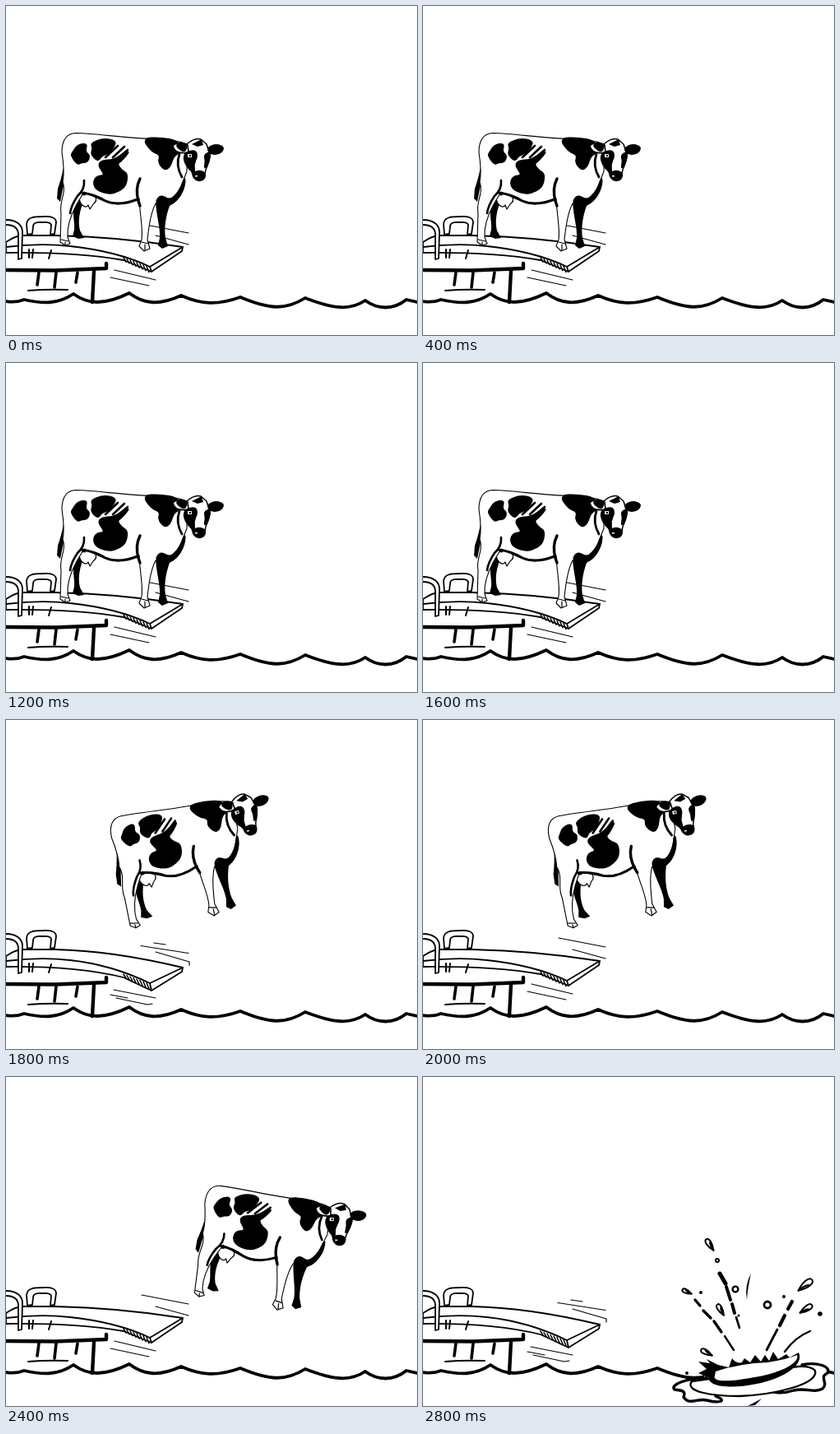
Write an HTML page with a canvas that moves like this. It is 500 by 400 pixels and loops after 3.8 s.

```html
<!DOCTYPE html>
<html lang="en">
<head>
<meta charset="utf-8">
<title>Diving cow</title>
<style>
html, body { margin: 0; width: 100%; height: 100%; overflow: hidden; background: #fff; }
canvas { display: block; }
</style>
</head>
<body>
<canvas id="stage" width="500" height="400"></canvas>
<script>
const ctx = document.getElementById('stage').getContext('2d');
const LOOP = 3800, STEP = 200, LAST = 14;
ctx.lineCap = ctx.lineJoin = 'round';

function line(d, width = 1.8) {
  ctx.lineWidth = width;
  ctx.strokeStyle = '#000';
  ctx.stroke(new Path2D(d));
}
function fill(d, color = '#000') {
  ctx.fillStyle = color;
  ctx.fill(new Path2D(d));
}
function shape(d, width = 1.8) {
  fill(d, '#fff');
  line(d, width);
}
function dot(x, y, r, ring = 0) {
  ctx.beginPath();
  ctx.arc(x, y, r, 0, Math.PI * 2);
  ctx.fillStyle = ring ? '#fff' : '#000';
  ctx.fill();
  if (ring) { ctx.lineWidth = ring; ctx.stroke(); }
}
// Black patch with rounded corners near the given points
function patch(points) {
  const p = points.split(' ').map(s => s.split(',').map(Number));
  const mid = (a, b) => `${(a[0] + b[0]) / 2} ${(a[1] + b[1]) / 2}`;
  let d = 'M' + mid(p[p.length - 1], p[0]);
  p.forEach((q, i) => { d += `Q${q[0]} ${q[1]} ${mid(q, p[(i + 1) % p.length])}`; });
  fill(d);
  line(d, 1.8);
}

// Alternating crests and troughs of the water line
const WAVES = [[22, 357], [56, 362], [82, 350], [112, 363], [150, 349], [180, 363],
  [213, 352], [250, 363], [285, 354], [333, 369], [364, 355], [412, 369],
  [437, 358], [464, 369], [487, 357], [500, 361]];

function water(splashing) {
  ctx.save();
  if (splashing) {
    ctx.beginPath();
    ctx.rect(0, 330, 342, 60);
    ctx.rect(493, 330, 7, 60);
    ctx.clip();
  }
  let d = 'M0 359Q12 361 22 357';
  for (let i = 1; i < WAVES.length - 1; i += 2) {
    const [tx, ty] = WAVES[i], [cx, cy] = WAVES[i + 1];
    d += `C${tx - 12} ${ty} ${tx + 7} ${ty + 1} ${cx} ${cy}`;
  }
  line(d + 'L500 360', 3.8);
  ctx.restore();
}

function dock() {
  line('M0 321L60 321.5L122 319V313', 4.4);
  line('M107 322L105 360', 4.4);
  line('M40 324L38 339M61 324L59 342M87 324L85 336', 3.6);
  line('M27 346Q50 344 75 345', 2);
}

function board(low) {
  const k = low ? 1 : 0, tip = 293 + 8 * k, front = 317 + 3 * k;
  const bottom = 323 + 6 * k;
  shape(`M0 287Q12 279 20 279H60C110 280 165 ${285 + 4 * k} 215 ${tip}` +
    `L214 ${tip + 5}L177 ${bottom}L143 ${309 + 4 * k}Q85 299 0 300Z`);
  line(`M0 293Q42 288 78 292C115 296 148 ${304 + 3 * k} 175 ${front}L215 ${tip}` +
    `M175 ${front}L177 ${bottom}`);
  for (let i = 0; i < 8; i++) {
    const x = 143 + i * 4, y = 306 + 3 * k + i * 1.5;
    line(`M${x} ${y}l3 ${5 + i * 0.3}`, 1.5);
  }
  line(low
    ? 'M180 271L194 273M164 274.5L222 283.5M182 282L223 294V298M131 328L182 338M127 334L148 338M134 338L172 346L178 345'
    : 'M165 265L222 276M182 279L222 290M132 321L182 333M127 330L174 340', 1.2);
}

function rails() {
  line('M28 296V306M33 296L32 306M55 297L52 307', 2);
  shape('M0 260C14 260 20 267 20 275L19 307L15 308V277Q14 266 0 266');
  shape('M26 278L25 265C26 257 33 256 45 256Q61 255 61 263L59 277L54 278L55 266Q54 262 44 263Q33 262 33 268L32 277Z');
}

function cow(x, y, degrees) {
  ctx.save();
  ctx.translate(x, y);
  ctx.rotate(degrees * Math.PI / 180);
  ctx.translate(-163, -224);

  // Far legs and tail
  fill('M84 234C79 248 84 262 83 272L81 280L88 283L95 282L90 273C87 260 90 248 95 236L99 222Z');
  fill('M182 238C183 256 188 270 187 282L185 291L190 295L197 292L194 282C192 268 195 254 199 243L209 234L204 222Z');
  fill('M70 196Q67 211 63 222L62 234L66 238L70 218Z');

  // Body, udder and near legs
  shape('M90 230C87 240 97 248 100 242L102 247L106 241Q112 237 108 231', 1.2);
  shape('M85 154.5C73 155 68 164 68 178C71 197 70 209 69 214C74 228 64 238 67 252L66 287L72 291L78 289L75 281' +
    'C74 265 80 252 86 241L95 226C110 233 122 240 136 241Q150 239 162 234' +
    'C163 256 167 271 165 284L162 292L168 298L175 295L172 284C174 267 176 252 182 240' +
    'Q204 239 213 219L220 201L220 168Q206 162 180 161.5C145 161 112 155 85 154.5Z', 1.1);
  line('M92 227Q108 229 121 237Q137 244 160 235', 3);
  line('M163 210Q157 222 161 237L163 243', 3.4);
  line('M95 212Q96 223 87 231Q79 243 78 252', 2.6);
  line('M67 284L76 286M165 287L173 289M72 287V291M169 290V297', 1.2);
  patch('181,240 188,229 200,237 212,224 218,206 217,222 207,238 194,244');

  // Coat patches
  patch('81,178 87,169 99,167 96,177 102,182 99,190 92,190 87,193 79,182');
  patch('103,167 118,161 134,164 131,172 124,180 116,182 112,189 103,180 106,173');
  patch('116,188 131,187 142,180 151,176 141,188 135,192 141,200 148,204 146,218 138,225 126,229 110,224 106,215 110,207 121,206 112,194');
  line('M121 184L136 170M130 184L144 171M136 185L148 175', 2.6);
  patch('166,161 188,160 209,164 214,177 204,182 200,195 193,200 185,190 188,181 177,177');
  line('M211 180Q206 194 214 208', 2.8);

  // Head
  shape('M220 168Q229 160 237 162L244 168L248 181Q247 191 243 199L241 209Q234 214 228 207L225 199Q216 190 218 174Z', 1.5);
  shape('M222 178Q205 181 203 170Q210 163 221 169Z', 1.6);
  patch('205,168 219,167 220,173 216,178');
  patch('245,172 256,168 266,172 260,180 248,180');
  patch('218,178 230,175 233,182 228,193 230,204 222,198 216,187');
  patch('241,181 249,177 247,190 241,199 243,188');
  patch('227,203 235,200 243,203 241,211 234,213 228,209');
  fill('M226 168L238 162L240 169L233 171Z');
  ctx.fillStyle = '#fff';
  ctx.fillRect(221, 180, 5, 4);
  ctx.fillRect(230, 206, 3, 1.5);
  dot(224, 182, 1.2);
  ctx.restore();
}

// A drop whose round end leads in the given direction
function drop(x, y, length, degrees) {
  ctx.save();
  ctx.translate(x, y);
  ctx.rotate(degrees * Math.PI / 180);
  const h = length / 2, w = length * 0.25;
  shape(`M${-h} 0C0 ${-w} ${h} ${-w} ${h} 0C${h} ${w} 0 ${w} ${-h} 0Z`, 2);
  line(`M${-h} 0Q0 0 ${h * 0.3} ${w * 0.5}`, 2.4);
  ctx.restore();
}

function splash() {
  // Spreading ripples
  shape('M345 366C321 366 300 374 306 380C316 381 320 382 317 389C324 400 334 390 345 393C361 397 371 394 356 388', 3.4);
  shape('M461 350C480 346 497 352 492 360C481 365 494 372 486 379C474 385 467 377 451 381C436 386 422 384 413 377', 3.4);
  shape('M327 370C318 382 349 388 385 388C430 386 482 373 477 357Q472 351 456 352Z', 2.3);
  fill('M395 400L412 391L404 399Z');

  // Crater
  fill('M335 346L349 348L345 343L359 350L372 353L376 342Q381 349 388 347L391 342L398 347L404 338L411 346L416 338L421 345L426 334L432 343L442 337L446 341L457 335' +
    'C465 351 434 368 406 373C373 380 347 376 348 366L335 360L345 355Z');
  fill('M356 358Q386 348 419 347Q444 343 455 338C459 349 430 361 403 365C373 371 351 371 355 363Z', '#fff');

  // Spray
  line('M361 239L368 251', 5);
  line('M369 255L374 271M376 276L379 287', 4);
  line('M381 292L385 305', 2.6);
  line('M331 271L337 278M341 284L350 293M354 297L363 310', 3.4);
  line('M367 315L378 332', 2.4);
  line('M449 273L444 282M440 290L434 302', 4.2);
  line('M431 307L418 332', 2.8);
  line('M471 309Q453 316 440 334', 2.4);
  fill('M399 239Q391 253 394 271Q395 256 399 239Z');
  drop(349, 204, 16, 237);
  drop(321, 261, 12, 205);
  drop(362, 283, 15, 240);
  drop(345, 335, 15, 208);
  drop(465, 253, 21, -38);
  drop(466, 282, 17, -33);
  dot(380, 258, 3.4, 2.4);
  dot(419, 277, 4, 2.8);
  dot(358, 223, 2, 2);
  dot(338, 262, 2);
  dot(439, 267, 2);
  dot(483, 288, 2.8);
  dot(321, 360, 2);
  dot(384, 290, 1.5);
}

const UP = [163, 224, 0], DOWN = [169.6, 234, 5.5];
const JUMP = [[231.5, 167, -13], [256.5, 167, -13], [304.6, 172, 5.5], [332, 209, 5.5], [384, 314, 30]];

function frame(now) {
  const step = Math.min(LAST, Math.floor(now % LOOP / STEP));
  const low = step === LAST || step % 2 === 1;
  ctx.fillStyle = '#fff';
  ctx.fillRect(0, 0, 500, 400);
  water(step === LAST);
  dock();
  board(low);
  rails();
  if (step === LAST) splash();
  else cow(...(step < 9 ? (low ? DOWN : UP) : JUMP[step - 9]));
}

const start = performance.now();
function tick() {
  frame(performance.now() - start);
  requestAnimationFrame(tick);
}
tick();
</script>
</body>
</html>
```
